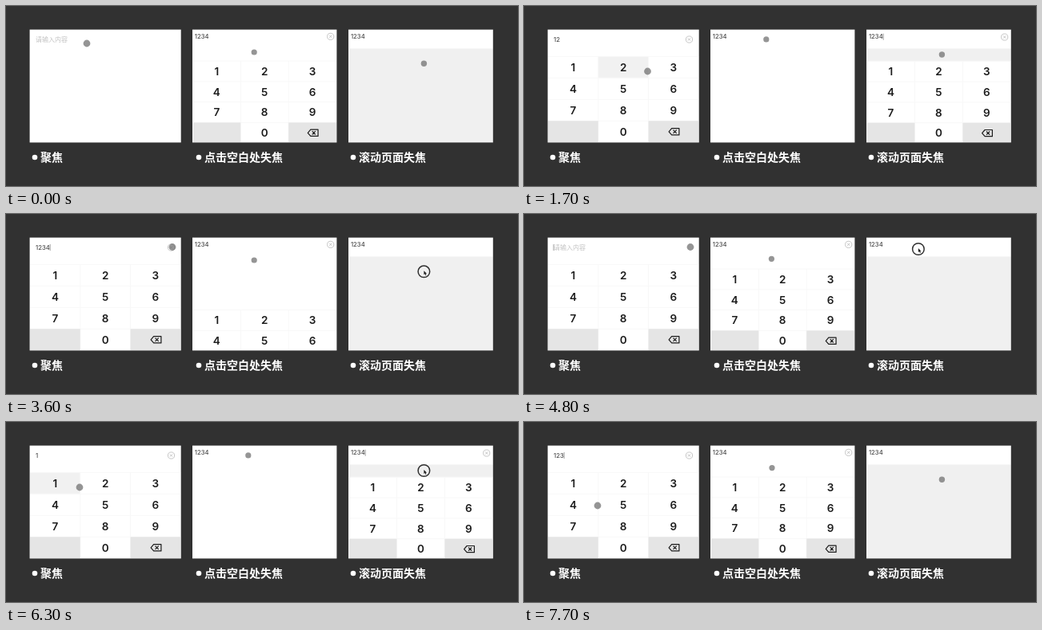
Animation of 640x226 px, one loop 7800 ms. Source, as an HTML page:

```html
<!DOCTYPE html>
<html lang="zh">
<head>
<meta charset="utf-8">
<style>
  html, body { margin: 0; width: 100%; height: 100%; overflow: hidden; background: #313131; }
  svg { display: block; }
  .caption { font: 700 14px "Noto Sans CJK SC", "Noto Sans CJK", sans-serif; fill: #fff; }
  .hint { font: 400 8px "Noto Sans CJK SC", "Noto Sans CJK", sans-serif; fill: #c2c2c2; }
  .value { font: 500 7.7px Inter, Roboto, sans-serif; fill: #4a4a4a; }
  .digit { font: 600 13.5px Inter, Roboto, sans-serif; fill: #1c1c1c; text-anchor: middle; }
  .line { stroke: #f8f8f8; fill: none; }
  .icon { stroke: #1c1c1c; stroke-width: 1.2; fill: none; stroke-linejoin: round; }
  .clear { stroke: #b8b8b8; stroke-width: .8; fill: none; }
  .caret { stroke: #888; stroke-width: .8; }
  .dot { fill: #6e6e6e; fill-opacity: .73; }
  .ring { stroke: #303030; stroke-width: 1.5; fill: none; }
</style>
</head>
<body>
<svg id="stage" width="640" height="226" viewBox="0 0 640 226"></svg>
<script>
const LOOP = 7800, STEP = 100, TOP = 30, HEIGHT = 141, SLIDE = 300;
const stage = document.getElementById('stage');

function add(parent, tag, attrs, text) {
  const el = document.createElementNS('http://www.w3.org/2000/svg', tag);
  for (const k in attrs) el.setAttribute(k, attrs[k]);
  if (text !== undefined) el.textContent = text;
  parent.appendChild(el);
  return el;
}

const show = (el, on) => el.setAttribute('visibility', on ? 'visible' : 'hidden');
const move = (el, x, y) => el.setAttribute('transform', `translate(${x} ${y})`);
const clamp = (v, lo, hi) => Math.max(lo, Math.min(hi, v));
const mix = (a, b, k) => a + (b - a) * k;

// Eased progress of t from a to b
function ease(t, a, b) {
  const p = clamp((t - a) / (b - a), 0, 1);
  return p * p * (3 - 2 * p);
}

// Rest at each [arrival, x, y], travelling for dur before arriving
function glide(stops, t, dur) {
  const i = stops.findLastIndex(s => s[0] - dur <= t);
  const to = stops.at(i), from = stops.at(i - 1);
  const k = i < 0 ? 1 : ease(t, to[0] - dur, to[0]);
  return [mix(from[1], to[1], k), mix(from[2], to[2], k)];
}

function keypad(parent, width, top, rowH) {
  const g = add(parent, 'g', {}), colW = width / 3, last = top + 3 * rowH;
  add(g, 'rect', { y: top, width, height: HEIGHT - top + 2, fill: '#fff' });
  const lit = add(g, 'rect', { width: colW, height: rowH, fill: '#f1f1f1', visibility: 'hidden' });
  let d = '';
  for (let r = 0; r < 4; r++) d += `M0 ${top + r * rowH}H${width}`;
  for (const c of [1, 2]) d += `M${c * colW} ${top}V${HEIGHT}`;
  add(g, 'path', { d, class: 'line' });
  for (const c of [0, 2])
    add(g, 'rect', { x: c * colW, y: last, width: colW, height: rowH + 2, fill: '#e5e5e5' });
  for (let n = 1; n <= 10; n++) {
    const c = n === 10 ? 1 : (n - 1) % 3, r = Math.floor((n - 1) / 3);
    add(g, 'text', { x: (c + .5) * colW, y: top + (r + .5) * rowH + 4.8, class: 'digit' }, n % 10);
  }
  const icon = add(g, 'path', {
    d: 'M-6.5 0L-3 -4.1H6.3V4.1H-3ZM-1.1 -2.1L3.1 2.1M3.1 -2.1L-1.1 2.1', class: 'icon'
  });
  move(icon, 2.5 * colW + .7, last + rowH / 2);

  return {
    slide(open) { move(g, 0, (1 - open) * (HEIGHT - top + 1)); },
    light(n) {
      show(lit, n);
      if (n) move(lit, (n - 1) % 3 * colW, top + Math.floor((n - 1) / 3) * rowH);
    }
  };
}

function clearIcon(parent, x, y) {
  const g = add(parent, 'g', { class: 'clear' });
  add(g, 'circle', { r: 4.1 });
  add(g, 'path', { d: 'M-1.6 -1.6L1.6 1.6M1.6 -1.6L-1.6 1.6' });
  move(g, x, y);
  return g;
}

function panel(x, width, fill, bullet, label) {
  add(stage, 'circle', { cx: bullet, cy: 190, r: 3.3, fill: '#fff' });
  add(stage, 'text', { x: bullet + 7, y: 195, class: 'caption' }, label);
  add(stage, 'rect', { x: x - .4, y: TOP - .4, width: width + .8, height: HEIGHT + .8, fill });
  return add(stage, 'svg', { x, y: TOP, width, height: HEIGHT, overflow: 'hidden' });
}

const caretAt = (parent, x, y) =>
  add(parent, 'path', { d: `M${x} ${y - 4}V${y + 4}`, class: 'caret' });
const pointer = (parent, r) => add(parent, 'circle', { r, class: 'dot' });

// Focus panel: two typing passes with a clear between them
function focusPanel() {
  const box = panel(30, 188.3, '#fff', 36, '聚焦');
  const hint = add(box, 'text', { x: 7, y: 15, class: 'hint' }, '请输入内容');
  const value = add(box, 'text', { x: 7, y: 14.5, class: 'value' }, '');
  const caret = caretAt(box, 0, 12), clear = clearIcon(box, 176.5, 12);
  const pad = keypad(box, 188.3, 33.3, 27), dot = pointer(box, 4.4);

  const passes = [{ start: 1100, gap: 550 }, { start: 6000, gap: 600 }];
  const clearAt = 4500, travel = 200;
  const visits = ({ start, gap }) => [1, 2, 3, 4].map(n =>
    [start + (n - 1) * gap - 100, 62 + (n - 1) % 3 * 62.5, 52 + Math.floor((n - 1) / 3) * 23]);
  const stops = [[0, 71, 17], ...visits(passes[0]), [3500, 178, 11.5], ...visits(passes[1])];

  return t => {
    const { start, gap } = passes[t < clearAt ? 0 : 1];
    const count = clamp(Math.floor((t - start) / gap) + 1, 0, 4);
    const sinceTap = t - start - (count - 1) * gap;
    value.textContent = '1234'.slice(0, count);
    show(hint, !count);
    show(clear, count);
    pad.slide(ease(t, 200, 200 + SLIDE));
    pad.light(sinceTap < 350 ? count : 0);
    show(caret, t > 200 && t % 1100 < 550);
    move(caret, 7 + (count ? value.getComputedTextLength() + .4 : 0), 0);
    move(dot, ...glide(stops, t, travel));
  };
}

// Tap panel: alternate taps on the blank area and on the field
function tapPanel() {
  const box = panel(233.4, 179.6, '#fff', 241, '点击空白处失焦');
  add(box, 'text', { x: 2.4, y: 10.8, class: 'value' }, '1234');
  const clear = clearIcon(box, 172.3, 8.3);
  const pad = keypad(box, 179.6, 39, 25.8), dot = pointer(box, 3.6);

  const taps = [0, 1800, 3450, 4200, 4900, 6400, LOOP];
  const blank = [76.8, 28], field = [69.2, 11.5];

  return t => {
    const i = taps.findLastIndex(a => a <= t), closing = i % 2 === 0;
    const k = ease(t, taps[i], taps[i] + SLIDE);
    const open = closing ? 1 - k : k;
    pad.slide(open);
    show(clear, open > 0);
    const next = taps[i + 1];
    const go = ease(t, Math.max(taps[i] + 200, next - 1000), next);
    const [from, to] = closing ? [blank, field] : [field, blank];
    move(dot, mix(from[0], to[0], go), mix(from[1], to[1], go));
  };
}

// Scroll panel: tap the field, then drag the page up and back
function scrollPanel() {
  const box = panel(428.4, 180, '#f0f0f0', 434, '滚动页面失焦');
  const bar = add(box, 'g', {});
  add(bar, 'rect', { y: -1, width: 180, height: 24.5, fill: '#fff' });
  add(bar, 'text', { x: 2.5, y: 11.3, class: 'value' }, '1234');
  const caret = caretAt(bar, 20.8, 8.7), clear = clearIcon(bar, 172.3, 9);
  const pad = keypad(box, 180, 39.3, 25.8), dot = pointer(box, 3.7);
  const ring = add(box, 'g', {});
  add(ring, 'circle', { r: 7.3, class: 'ring' });
  add(ring, 'path', { d: 'M0 -1V4L1.2 3L2.2 5L3 4.5L2.2 2.7H3.6Z', fill: '#1c1c1c' });

  const cycle = 3800, tapAt = 1050, dragAt = 1450, dragEnd = 2400, grabY = 31;
  const stops = [[600, 94, grabY], [dragAt + SLIDE, 98, -4], [dragEnd, 94, 42.3], [3700, 64.5, 14]];

  return t => {
    const u = (t - tapAt + cycle) % cycle;
    const [x, y] = glide(stops, u, SLIDE);
    const open = ease(u, 0, SLIDE) - ease(u, dragAt, dragAt + SLIDE);
    const dragging = u >= dragAt && u < dragEnd;
    const held = u < 150 || u > cycle - 150 || (u >= dragAt - 50 && u < dragEnd + 250);
    pad.slide(open);
    show(clear, open > 0);
    show(caret, open > 0 && t % 1100 >= 550);
    move(bar, 0, dragging ? Math.min(0, y - grabY) : 0);
    show(ring, held);
    show(dot, !held);
    move(ring, x, y);
    move(dot, x, y);
  };
}

const panels = [focusPanel(), tapPanel(), scrollPanel()];
const start = performance.now();
function frame() {
  const t = (performance.now() - start) % LOOP;
  const tick = Math.floor(t / STEP) * STEP;
  panels.forEach(draw => draw(tick));
  requestAnimationFrame(frame);
}
frame();
</script>
</body>
</html>
```
